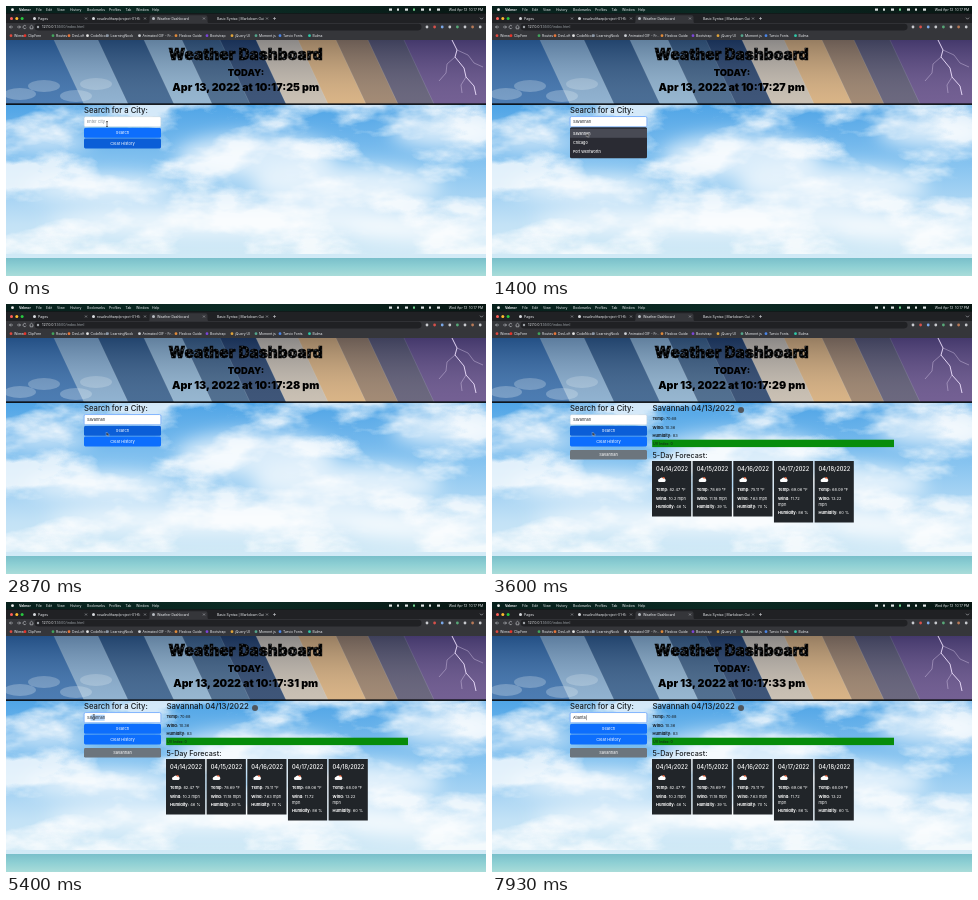
Write an HTML page that moves like this. It is 480 px wide and 270 px high and loops after 8000 ms.

```html
<!DOCTYPE html>
<html lang="en">
<head>
<meta charset="utf-8">
<title>Weather Dashboard</title>
<style>
html, body { margin: 0; width: 100%; height: 100%; overflow: hidden; background: #000; }
svg { position: absolute; left: 0; top: 0; width: 480px; height: 270px; }
text { font-family: Inter, Roboto, sans-serif; white-space: pre; }
.heavy { font-weight: 900; text-anchor: middle; }
.mid { text-anchor: middle; }
.b { font-weight: 700; }
.h { font-weight: 500; }
#list, #preview, #results, #focus, #ibeam, #arrow { animation: 8s step-end infinite; }
#list { animation-name: list; }
#preview { animation-name: preview; }
#results { animation-name: results; }
#focus { animation-name: focus; }
#ibeam { animation-name: ibeam; }
#arrow { animation-name: arrow; }
#pick { animation: pick 8s linear infinite; transform-box: fill-box; transform-origin: right; }
#search { animation: search 8s linear infinite; }
#clear { animation: clear 8s linear infinite; }
#cursor { animation: move 8s ease-in-out infinite; }
@keyframes list { 0% { opacity: 0 } 5% { opacity: 1 } 20%, 100% { opacity: 0 } }
@keyframes preview { 0% { opacity: 0 } 16.25% { opacity: 1 } 20%, 100% { opacity: 0 } }
@keyframes results { 0% { opacity: 0 } 40.6%, 100% { opacity: 1 } }
@keyframes focus { 0% { opacity: 0 } 4.2% { opacity: 1 } 37.5% { opacity: 0 } 61%, 100% { opacity: 1 } }
@keyframes ibeam { 0% { opacity: 1 } 15.5% { opacity: 0 } 52.5% { opacity: 1 } 72%, 100% { opacity: 0 } }
@keyframes arrow { 0% { opacity: 0 } 15.5% { opacity: 1 } 52.5% { opacity: 0 } 72% { opacity: 1 } 86.8%, 100% { opacity: 0 } }
@keyframes pick {
  0%, 62% { transform: scaleX(0); opacity: 1 }
  69%, 86.8% { transform: scaleX(1); opacity: 1 }
  86.81%, 100% { transform: scaleX(1); opacity: 0 }
}
@keyframes search { 0%, 25% { fill: #0d6efd } 27%, 51% { fill: #0b5ed7 } 53%, 100% { fill: #0d6efd } }
@keyframes clear { 0% { fill: #0b5ed7 } 2%, 100% { fill: #0d6efd } }
@keyframes move {
  0% { transform: translate(101px, 118px) }
  8.4%, 13% { transform: translate(102.5px, 116px) }
  17%, 22% { transform: translate(94.5px, 127px) }
  30%, 46% { transform: translate(100.5px, 128px) }
  55%, 62% { transform: translate(104.5px, 117px) }
  75%, 100% { transform: translate(59.5px, 112px) }
}
</style>
</head>
<body>
<svg viewBox="0 0 480 270">
  <defs>
    <linearGradient id="sky" x2="0" y2="1">
      <stop offset="0" stop-color="#4fa4e6"/><stop offset=".35" stop-color="#86c3f0"/>
      <stop offset=".7" stop-color="#c3e2f6"/><stop offset="1" stop-color="#d9eef6"/>
    </linearGradient>
    <linearGradient id="sea" x2="0" y2="1">
      <stop offset="0" stop-color="#79bfca"/><stop offset=".5" stop-color="#8fd0d4"/><stop offset="1" stop-color="#a9dcd9"/>
    </linearGradient>
    <linearGradient id="shade" x2="0" y2="1">
      <stop offset="0" stop-color="#0a1a38" stop-opacity=".3"/><stop offset="1" stop-color="#fff" stop-opacity=".14"/>
    </linearGradient>
    <linearGradient id="bar">
      <stop offset="0" stop-color="#07201c"/><stop offset=".5" stop-color="#0b2b24"/><stop offset="1" stop-color="#081613"/>
    </linearGradient>
    <filter id="soft" x="-30%" y="-50%" width="160%" height="200%"><feGaussianBlur stdDeviation="9"/></filter>
    <filter id="puff" x="0" y="0" width="100%" height="100%">
      <feTurbulence type="fractalNoise" baseFrequency=".012 .026" numOctaves="5" seed="8"/>
      <feColorMatrix values="0 0 0 0 1  0 0 0 0 1  0 0 0 0 1  4.5 0 0 0 -1.95"/>
    </filter>
    <clipPath id="top"><rect y="34" width="480" height="64"/></clipPath>
    <clipPath id="air"><rect y="98" width="480" height="155"/></clipPath>
  </defs>
  <rect y="98" width="480" height="172" fill="url(#sky)"/>
  <g clip-path="url(#air)">
    <rect y="98" width="480" height="150" filter="url(#puff)" opacity=".75"/>
    <g id="clouds" fill="#fff" filter="url(#soft)"></g>
  </g>
  <rect y="252" width="480" height="18" fill="url(#sea)"/>
  <g clip-path="url(#top)">
    <g id="slices"></g>
    <rect y="34" width="480" height="64" fill="url(#shade)"/>
    <g fill="none" stroke="#f0e2ff" stroke-linejoin="round">
      <path d="M446 34l5 10-2 7 9 11 2 9 8 9 2 9" stroke-width=".9"/>
      <path d="M449 51l-8 7-1 9-7 8M460 71l-5 8 1 8M451 44l11 5 6 8 9 4" stroke-width=".45" opacity=".8"/>
    </g>
  </g>
  <rect y="97.4" width="480" height="1.5" fill="#05070b"/>
  <rect width="480" height="7.5" fill="url(#bar)"/>
  <rect y="7.5" width="480" height="10" fill="#202124"/>
  <rect y="17" width="480" height="17" fill="#35363a"/>
  <path d="M142 17.2q1.5 0 1.5-2v-4q0-2 2-2h54q2 0 2 2v4q0 2 1.5 2z" fill="#35363a"/>
  <rect x="28.5" y="17.8" width="387" height="6.6" rx="3.3" fill="#202124"/>
  <g id="window" fill="#e8eaed" font-size="3.4"></g>
  <path d="M7 21H3.5m1.5-1.5L3.5 21 5 22.5M11 21h3.5M13 19.5l1.5 1.5-1.5 1.5M20 20.2a1.6 1.6 0 1 0 .1 1.5M23.5 21l2-1.7 2 1.7M24.2 21v1.8h2.6V21M267 12.5h3M268.5 11v3M474 11.7l1.5 1.5 1.5-1.5" fill="none" stroke="#c8cace" stroke-width=".6"/>
</svg>

<svg viewBox="0 0 480 270">
  <defs>
    <pattern id="worn" width="7" height="5" patternUnits="userSpaceOnUse">
      <rect width="7" height="5"/>
      <path d="M.5 1h2M4.5 2.7H6M2 4.2h1.5" stroke="#b9cbe0" stroke-width=".5"/>
    </pattern>
  </defs>
  <text class="heavy" x="239.7" y="53.6" font-size="15.4" fill="url(#worn)" stroke="#000" stroke-width=".5">Weather Dashboard</text>
  <text class="heavy" x="240" y="69.8" font-size="9.4">TODAY:</text>
  <text class="heavy" x="239.7" y="84.8" font-size="10.7" id="clock"></text>

  <text class="h" x="78" y="107.2" font-size="7.7" fill="#15191d">Search for a City:</text>
  <rect x="78.2" y="110.7" width="76.6" height="10" rx="1.5" fill="#fff" stroke="#ced4da" stroke-width=".4"/>
  <rect id="focus" x="78" y="110.5" width="77" height="10.4" rx="1.6" fill="none" stroke="#86b7fe"/>
  <rect id="pick" x="80.7" y="112.7" width="18" height="6" fill="#b3d5fb"/>
  <text id="field" x="81" y="117.2" font-size="3.9"></text>
  <rect id="caret" y="113.2" width=".4" height="5" fill="#222"/>
  <rect id="search" x="78" y="122" width="77" height="9.8" rx="1.4" fill="#0d6efd"/>
  <rect id="clear" x="78" y="132.6" width="77" height="9.8" rx="1.4" fill="#0d6efd"/>
  <g class="mid" fill="#fff" font-size="4">
    <text x="116.5" y="128.4">Search</text>
    <text x="116.5" y="139">Clear History</text>
  </g>
  <g id="results"></g>
  <g id="list">
    <rect x="78" y="121.2" width="77" height="31" rx="1.5" fill="#2a2b33"/>
    <rect id="preview" x="78" y="122.8" width="77" height="9" fill="#484a54"/>
    <g fill="#fff" font-size="3.7" class="h">
      <text x="81" y="128.7">Savannah</text>
      <text x="81" y="137.7">Chicago</text>
      <text x="81" y="146.7">Port Wentworth</text>
    </g>
  </g>
  <g id="cursor">
    <path id="ibeam" d="M-1-2.5H1M0-2.5v5M-1 2.5H1" fill="none" stroke="#222" stroke-width=".6"/>
    <path id="arrow" d="M0 0v3.8l.9-.8.7 1.5.7-.3-.7-1.5h1.2z" fill="#111" stroke="#fff" stroke-width=".35"/>
  </g>
</svg>

<script>
const $ = id => document.getElementById(id);
const text = (x, y, s, more = '') => `<text x="${x}" y="${y}" ${more}>${s}</text>`;
const dot = (x, y, r, fill) => `<circle cx="${x}" cy="${y}" r="${r}" fill="${fill}"/>`;
const box = (x, y, w, h, fill) => `<rect x="${x}" y="${y}" width="${w}" height="${h}" fill="${fill}"/>`;
const puff = (x, y, rx, ry, more) => `<ellipse cx="${x}" cy="${y}" rx="${rx}" ry="${ry}" ${more}/>`;

// Header collage: left edge at the top, colour
const slices = [[-40, '#2f67a6'], [48, '#7fa6c9'], [92, '#2d5684'], [138, '#86abc9'],
  [176, '#36597f'], [214, '#1f3a63'], [250, '#c2b7a8'], [292, '#d3a873'],
  [330, '#94785f'], [362, '#54506a'], [398, '#5d4682']];
$('slices').innerHTML = slices.map(([x, c]) =>
  `<path d="M${x} 34H500V98H${x + 30}z" fill="${c}"/><path d="M${x} 34l30 64" stroke="#dfe8f2" stroke-opacity=".3" stroke-width=".5"/>`).join('') +
  [[14, 88], [38, 80], [70, 90], [90, 78]].map(([x, y]) => puff(x, y, 16, 6, 'fill="#dfeaf4" opacity=".3"')).join('');

$('clouds').innerHTML = [[40, 135, 45, 9], [95, 182, 75, 13], [250, 150, 80, 22], [340, 180, 95, 20],
  [440, 125, 55, 17], [230, 215, 190, 14], [430, 225, 90, 12]].map(c => puff(...c, 'opacity=".7"')).join('');

const menu = [[30, 'File'], [40, 'Edit'], [51, 'View'], [64, 'History'], [81, 'Bookmarks'], [103, 'Profiles'],
  [119.5, 'Tab'], [130, 'Window'], [146, 'Help']];
const tabs = [[32, 'Pages', '#d8dade', 80], [91, 'rosalindtharp/project-01-Ki', '#d8dade', 139],
  [151, 'Weather Dashboard', '#b8bcc2', 198], [211, 'Basic Syntax | Markdown Gui', '#202124', 261]];
const marks = [[8, 'Wimex', '#e04a3f'], [22, 'ClipFern', '#e8332a'], [50, 'Routes', '#42a45c'], [66, 'DevLoft', '#e8773a'],
  [84.5, 'CodeNook', '#e6e6e6'], [104.5, 'LearningNook', '#8c98a8'], [136.5, 'Animated GIF - Fr…', '#cfd2d6'],
  [173, 'Flexbox Guide', '#e08a3a'], [204, 'Bootstrap', '#7b45d8'], [229, 'jQuery UI', '#e0a43a'],
  [253, 'Moment.js', '#55a58c'], [277, 'Tarvio Fonts', '#4b86e8'], [306.5, 'Bulma', '#2fc9a8']];
const cross = x => `<path d="M${x - 1} 11.5l2 2m0-2l-2 2" stroke="#c8cace" stroke-width=".45"/>`;
const tints = ['#c8cace', '#d8504a', '#7ba8e8', '#c8cace', '#58a878', '#c8cace', '#b87a58', '#c8cace'];
$('window').innerHTML =
  dot(6.5, 3.7, 1.4, '#eee') + text(13, 4.9, 'Velmor', 'class="b"') +
  menu.map(([x, s]) => text(x, 4.9, s)).join('') +
  Array.from({ length: 7 }, (_, i) => box(383 + i * 8, 2.5, 3 - i % 2, 2.2, i == 3 ? '#6fd08c' : '#dfe3e3')).join('') +
  text(477, 4.9, 'Wed Apr 13  10:17 PM', 'text-anchor="end"') +
  ['#ff5f57', '#febc2e', '#28c840'].map((c, i) => dot(5.5 + i * 5.3, 12.5, 1.5, c)).join('') +
  tabs.map(([x, s, c, end]) => dot(x - 3.5, 12.5, 1.5, c) + text(x, 13.7, s) + cross(end)).join('') +
  dot(32, 21, 1.2, '#a0a4a9') + text(36, 22.3, '127.0.0.1<tspan fill="#9aa0a6">:5500/index.html</tspan>', 'font-size="3.6"') +
  tints.map((c, i) => dot(421 + i * 7.6, 21, 1.4, c)).join('') +
  marks.map(([x, s, c]) => dot(x - 3, 29.7, 1.4, c) + text(x, 30.9, s)).join('');

const stat = (x, y, name, value) => text(x, y, `<tspan class="b">${name}:</tspan> ${value}`);
const days = [['82.47', '10.2', 46], ['78.69', '11.18', 39], ['75.11', '7.63', 70], ['69.06', '11.72', 86], ['68.09', '13.22', 60]];
const card = ([temp, wind, damp], i) => {
  const x = 160 + i * 40.65, tx = x + 4, wrap = i > 2;
  return box(x, 157, 39.2, wrap ? 61.5 : 55.5, '#212529') +
    '<g fill="#fff">' + text(tx, 166.7, `04/${14 + i}/2022`, 'class="h" font-size="5.7"') +
    dot(x + 11.5, 174.5, 1.5, '#e8623a') +
    `<path d="M${x + 7} 178a1.5 1.5 0 0 1 .4-2.9 2 2 0 0 1 3.7-.4 1.7 1.7 0 0 1 1.5 3.3z"/>` +
    stat(tx, 187.4, 'Temp', temp + ' °F') + stat(tx, 195.6, 'Wind', wind + (wrap ? '' : ' mph')) +
    (wrap ? text(tx, 201.6, 'mph') : '') + stat(tx, wrap ? 209.6 : 203.6, 'Humidity', damp + ' %') + '</g>';
};
$('results').innerHTML =
  '<rect x="78" y="146" width="77" height="9.6" rx="1.4" fill="#6c757d"/>' +
  '<g font-size="4" fill="#15191d">' + text(116.5, 152.3, 'Savannah', 'class="mid" fill="#fff"') +
  text(160.5, 107.2, 'Savannah 04/13/2022', 'class="h" font-size="7.8"') + dot(249, 106, 3, '#50565d') +
  stat(160.5, 116.2, 'Temp', '70.68') + stat(160.5, 124.5, 'Wind', '10.36') + stat(160.5, 132.7, 'Humidity', 83) +
  box(160.2, 135.7, 241.8, 7.4, '#078c0b') + text(161, 140.9, 'UV Index: 0', 'font-size="3.6"') +
  text(160.5, 153.6, '5-Day Forecast:', 'class="h" font-size="7.2"') + days.map(card).join('') + '</g>';

const field = $('field'), caret = $('caret'), clock = $('clock');
const put = (el, s) => { if (el.textContent !== s) el.textContent = s; };
const start = performance.now();
function draw() {
  const t = Math.max(0, performance.now() - start) % 8000;
  put(clock, `Apr 13, 2022 at 10:17:${25 + Math.floor((t + 800) / 1000)} pm`);
  const empty = t < 1300, typing = t >= 6950;
  put(field, empty ? 'Enter City...' : typing ? 'Atlanta'.slice(0, 1 + Math.floor((t - 6950) / 140)) : 'Savannah');
  field.setAttribute('fill', empty ? '#7b838a' : '#212529');
  const shown = typing || (t > 340 && t < 1300 && (t - 340) % 1000 < 500);
  caret.setAttribute('opacity', shown ? 1 : 0);
  caret.setAttribute('x', typing ? 81.3 + field.getComputedTextLength() : 80.6);
  requestAnimationFrame(draw);
}
draw();
</script>
</body>
</html>
```
